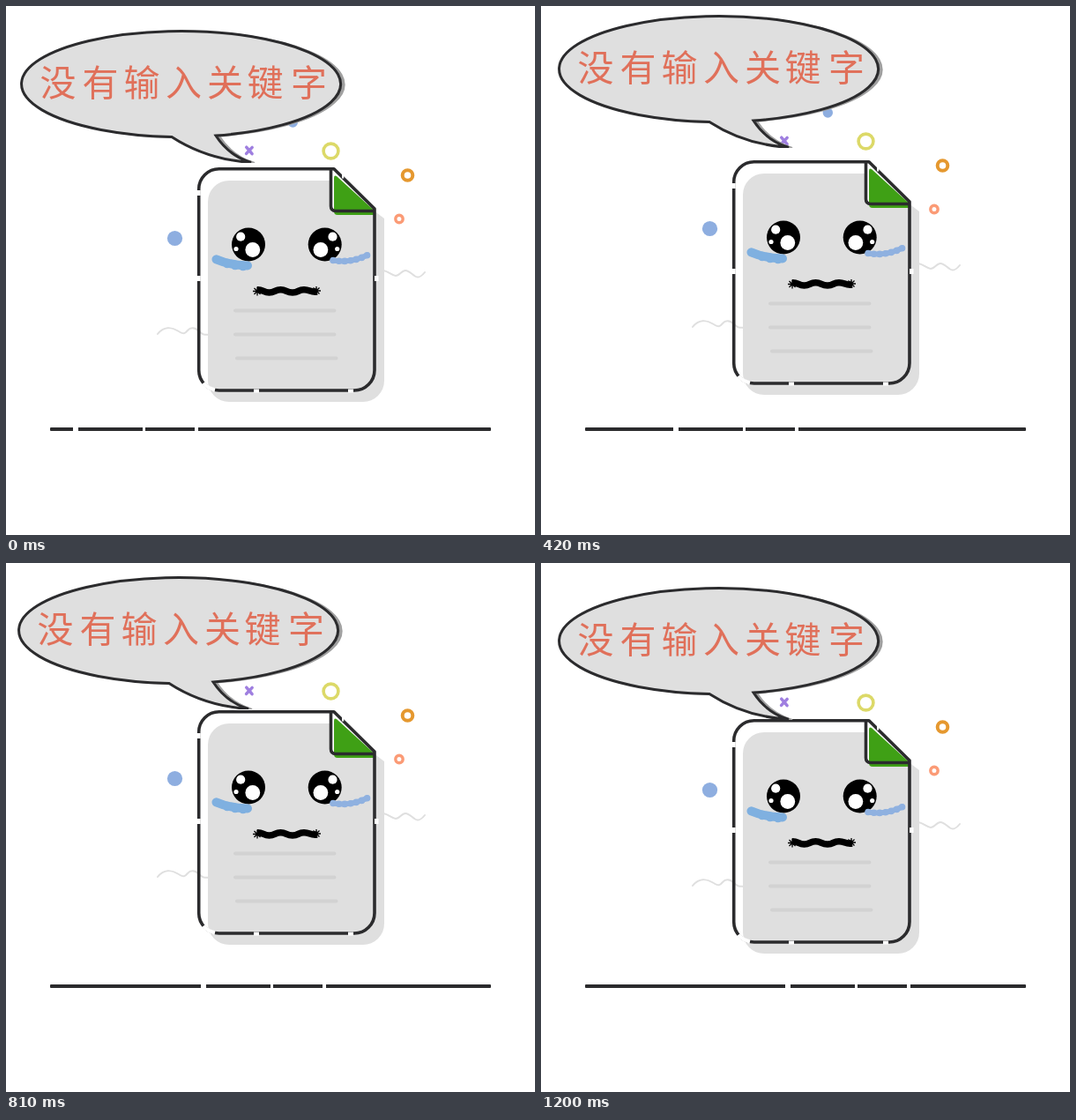
An HTML page for the animation above (1.26 s loop, 600 by 600 pixels).

```html
<!DOCTYPE html>
<html lang="zh-CN">
<head>
<meta charset="utf-8">
<title>没有输入关键字</title>
<style>
  html, body { margin: 0; width: 100%; height: 100%; overflow: hidden; background: #fff; }
  svg { display: block; width: 600px; height: 600px; }
  .line { fill: none; stroke: #2b2b2d; stroke-width: 3.6; }
  .soft { fill: none; stroke-linecap: round; stroke-linejoin: round; }
  text { font: 300 41px "Noto Sans CJK SC", "Noto Sans CJK", sans-serif; fill: #e0705a; }
</style>
</head>
<body>
<svg viewBox="0 0 600 600">
  <defs>
    <path id="balloon" d="M238 147.060A181 60 0 1 0 188 148.400C212 164 242 175 278 177.500C260 172 247 161 238 147.060Z"/>
    <clipPath id="cut"><path d="M0 0H400V178H0Z"/></clipPath>
    <g id="eye">
      <circle r="19"/>
      <g fill="#fff">
        <circle cx="-8.8" cy="-8.8" r="5.1"/>
        <circle cx="4.8" cy="6" r="8.4"/>
        <circle cx="-14" cy="5" r="2.6"/>
      </g>
    </g>
    <path id="spark" d="M-5 0H5M0-5V5M-3.5-3.5L3.5 3.5M-3.5 3.5L3.5-3.5" stroke="#000" stroke-width="1.3"/>
  </defs>

  <rect x="50" y="478" width="500" height="4" rx="1" fill="#2b2b2d"/>
  <path id="gaps" d="M76 477h6v6h-6zM155 477h3v6h-3zM214 477h4v6h-4z" fill="#fff"/>

  <g id="decor" fill="none">
    <circle cx="368.5" cy="164.5" r="8.4" stroke="#dcd968" stroke-width="3.6"/>
    <circle cx="455.5" cy="192" r="5.8" stroke="#e5982f" stroke-width="4"/>
    <circle cx="446" cy="241.5" r="4.2" stroke="#fb9b76" stroke-width="3.4"/>
    <circle cx="191.5" cy="263.5" r="8.6" fill="#8eaee0"/>
    <circle cx="325.3" cy="132" r="5.7" fill="#8eaee0"/>
    <path d="M272.7 160.2l6.4 7.4M279.2 160.4l-6.6 7" stroke="#9f7fe0" stroke-width="3.5" stroke-linecap="round"/>
  </g>

  <g id="page">
    <path class="soft" stroke="#dfdfdf" stroke-width="2" d="M172 372C179 363 188 364 195 368.500S203 371.500 206 368S214 364 219 369S226 372.500 231 373M428 300C434 301 438 306 442 306S449 300 453 300S460 304 464 306.500S471 307 475 302"/>
    <path fill="#dfdfdf" d="M253 198H372L429 241V425A24 24 0 0 1 405 449H253A24 24 0 0 1 229 425V222A24 24 0 0 1 253 198Z"/>
    <path fill="#fff" d="M368.500 184.700H372L418 230V232.500H368.500Z"/>
    <path fill="#3fa015" d="M372 195Q372 191 375.500 193.500L416 230.500L418 237H376Q372 237 372 233Z"/>
    <path class="line" stroke-linejoin="round" d="M372 184.700H241.700A23 23 0 0 0 218.700 207.700V413A23 23 0 0 0 241.700 436H395A23 23 0 0 0 418 413V230L372 184.700H368.500V227Q368.500 232.500 374 232.500H418"/>
    <path fill="#fff" d="M216 209h4.700v6h-4.700zM216 306h4.700v6h-4.700zM418 306h4.500v6h-4.500zM281 434.500h6v4h-6zM388 434.500h6v4h-6zM381 190.500h2.200v5h-2.200z"/>
    <path fill="none" stroke="#fff" stroke-width="4.400" d="M224 427.700A23 23 0 0 0 237 435.500"/>

    <use href="#eye" x="275" y="270.500"/>
    <use href="#eye" transform="translate(361.700 270.500) scale(-1 1)"/>

    <g class="soft" stroke="#7fb0e0">
      <path stroke-width="10" d="M238.500 287.300Q254 294 274 294.500"/>
      <path stroke-width="10.600" stroke-dasharray="0 9" d="M251 292Q262 294.700 270 295"/>
    </g>
    <g class="soft" stroke="#8fb1e0">
      <path stroke-width="6" d="M371 288.500Q391 292 410 282.500"/>
      <path stroke-width="7.600" stroke-dasharray="0 6.600" d="M371 288.500Q391 292 410 282.500"/>
    </g>

    <path fill="none" stroke="#000" stroke-width="7.600" d="M285 321.700C292 321.700 292 325 298.500 325S305 321.700 311.500 321.700S318 325 325 325S331 321.700 338 321.700S345 325 353 324"/>
    <use href="#spark" x="285" y="323.500"/>
    <use href="#spark" x="352" y="323"/>

    <path class="soft" stroke="#d2d2d2" stroke-width="4" d="M260 345.500H372.500M260 372.500H372.500M262 399.500H374.500"/>
  </g>

  <g id="bubble">
    <g clip-path="url(#cut)">
      <use href="#balloon" x="4" y="0.500" fill="#a0a0a0" stroke="#a0a0a0" stroke-width="2"/>
      <use href="#balloon" fill="#dfdfdf" stroke="#2b2b2d" stroke-width="3"/>
    </g>
    <text x="38.500 86.500 133.500 181 228 273.500 323" y="101.500">没有输入关键字</text>
  </g>
</svg>
<script>
  const LOOP = 1260, STEP = 30, LAST = 1200;

  // Floor travel by time; the other tracks run on this travel.
  const travel = [[0, 0], [90, 20], [300, 54], [540, 93], [690, 127], [930, 163], [1200, 201]];
  const pageY = [[0, 0], [127, -14], [146, -16], [163, -13], [201, -6]];
  const decorY = [[0, 0], [54, -8], [127, -18], [142, -20], [163, -15], [201, -6]];
  const bubbleX = [[0, 0], [54, 0], [103, 6.3], [127, 1], [163, -7], [201, 3]];
  const bubbleY = [[0, 0], [54, -13], [103, -23], [127, -17], [163, -8], [201, 0]];

  function at(track, p) {
    let i = 1;
    while (i < track.length - 1 && p > track[i][0]) i++;
    const [a, from] = track[i - 1], [b, to] = track[i];
    return from + (to - from) * (p - a) / (b - a);
  }

  const el = id => document.getElementById(id);
  const parts = { gaps: el("gaps"), page: el("page"), decor: el("decor"), bubble: el("bubble") };
  const move = (part, x, y) => part.setAttribute("transform", `translate(${x} ${y})`);

  function draw(ms) {
    const t = Math.min(LAST, Math.floor(ms % LOOP / STEP) * STEP);
    const d = at(travel, t);
    move(parts.gaps, Math.round(d), 0);
    move(parts.page, 0, Math.round(at(pageY, d)));
    move(parts.decor, 0, Math.round(at(decorY, d)));
    move(parts.bubble, Math.round(at(bubbleX, d)), Math.round(at(bubbleY, d)));
  }

  const start = performance.now();
  function tick() {
    draw(performance.now() - start);
    requestAnimationFrame(tick);
  }
  tick();
</script>
</body>
</html>
```
